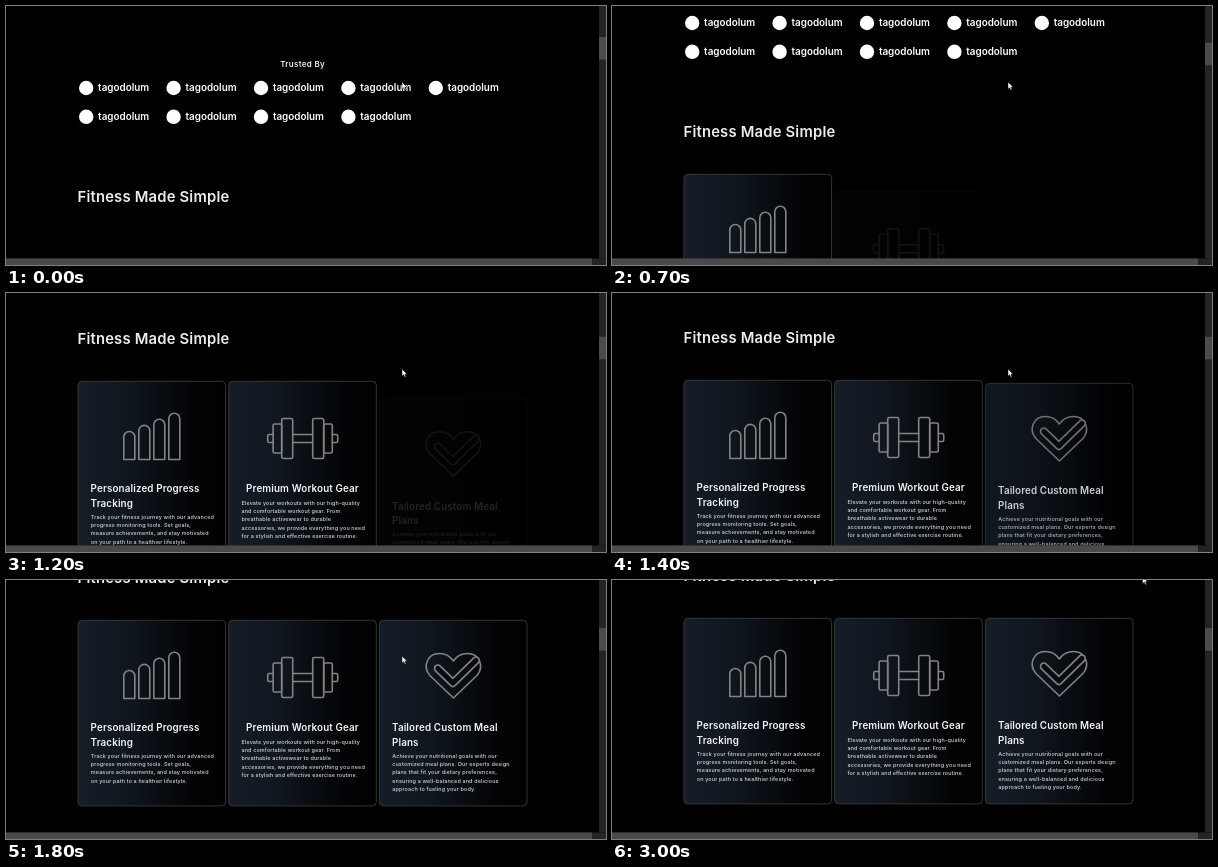
These frames come from a looping animation (600x259 px, 3.2 s). An HTML page:

```html
<!DOCTYPE html>
<html lang="en">
<head>
<meta charset="utf-8">
<title>Scrolling landing page</title>
<style>
  html, body { margin: 0; width: 100%; height: 100%; overflow: hidden; background: #000; }
  svg { display: block; width: 600px; height: 259px; }
  text { font-family: Inter, "Open Sans", sans-serif; fill: #fff; white-space: pre; }
  .heading { font-size: 14.8px; font-weight: 600; letter-spacing: .2px; fill: #ececec; }
  .trusted { font-size: 8px; font-weight: 600; letter-spacing: .3px; fill: #eee; }
  .brand { font-size: 9.9px; font-weight: 600; }
  .title { font-size: 9.8px; font-weight: 600; letter-spacing: .14px; fill: #f4f4f4; }
  .body { font-size: 5.45px; font-weight: 500; letter-spacing: .13px; fill: #d6d6d6; }
  .panel { fill: url(#shade); stroke: #3b3a38; stroke-width: .9; }
  .icon { fill: none; stroke: #838383; stroke-width: 1.6; stroke-linejoin: round; stroke-linecap: round; }
</style>
</head>
<body>
<svg viewBox="0 0 600 259">
  <defs>
    <linearGradient id="shade">
      <stop offset="0" stop-color="#151d27"/>
      <stop offset=".35" stop-color="#10161e"/>
      <stop offset=".8" stop-color="#020305"/>
      <stop offset="1" stop-color="#010102"/>
    </linearGradient>
  </defs>
  <rect width="600" height="259"/>
  <g id="page"></g>
  <g id="bars">
    <rect x="593" width="7" height="252.5" fill="#252424"/>
    <rect id="thumb" x="593" width="7" height="22.5" fill="#4c4b4c"/>
    <rect y="252.5" width="600" height="6.5" fill="#252424"/>
    <rect y="252.5" width="586" height="6.5" fill="#4a494b"/>
  </g>
  <path id="cursor" d="M0 0V7.2L1.7 5.7L2.8 8.2L4 7.7L2.9 5.2H5.1Z" fill="#fff" stroke="#000" stroke-width=".5"/>
</svg>
<script>
const LOOP = 3200, STEP = 100;

// Page offset for every step until the scroll comes to rest.
const SCROLL = [0, 0, 14, 39, 47, 48.5, 49, 65, 88, 96, 109, 133, 145, 146, 146, 146, 156, 181, 193, 195];
// Share of a card's entrance done, step by step.
const REVEAL = [.14, .65, .85, .95, 1];
const RISE = 20;
// [start ms, x, y]
const POINTER = [[0, 396, 76], [2300, 396.5, 76], [2400, 397, 76], [2900, 455, 42], [3000, 530.5, -3.5]];

const byId = id => document.getElementById(id);
const page = byId('page');

function add(parent, tag, attrs, content) {
  const node = document.createElementNS('http://www.w3.org/2000/svg', tag);
  for (const key in attrs) node.setAttribute(key, attrs[key]);
  if (content) node.textContent = content;
  parent.append(node);
  return node;
}
const label = (parent, kind, x, y, words, anchor = 'start') =>
  add(parent, 'text', { class: kind, x, y, 'text-anchor': anchor }, words);
const icon = (parent, d, extra = {}) => add(parent, 'path', { class: 'icon', d, ...extra });

label(page, 'trusted', 296.6, 60.8, 'Trusted By', 'middle');
for (let i = 0; i < 9; i++) {
  const x = 72.5 + (i % 5) * 87.4, y = i < 5 ? 82 : 110.8;
  add(page, 'circle', { cx: x + 7.7, cy: y, r: 7.2, fill: '#fff' });
  label(page, 'brand', x + 19.6, y + 3, 'tagodolum');
}
label(page, 'heading', 71.5, 196.4, 'Fitness Made Simple');

function drawChart(g) {
  for (let i = 0; i < 4; i++) {
    const x = 45.8 + i * 15, top = 289 - i * 6.1;
    icon(g, `M${x} 311.5V${top}a5.5 5.5 0 0 1 11 0V311.5Z`);
  }
}

function drawDumbbell(g) {
  for (const side of [-1, 1]) {
    const half = add(g, 'g', { transform: `translate(74 290.5) scale(${side} 1)` });
    icon(half, 'M10 -4H0M10 4H0');
    for (const [x, w, h] of [[10, 11, 40], [21, 8.6, 29]])
      add(half, 'rect', { class: 'icon', x, y: -h / 2, width: w, height: h, rx: 1.6 });
    icon(half, 'M29.6 -4H33.6Q35 -4 35 -2.6V2.6Q35 4 33.6 4H29.6');
  }
}

function drawHeart(g) {
  icon(g, 'M74 311L50.5 288.5C43 280 47.500 266.500 60 266.500C66 266.500 71 269.500 74 274' +
          'C77 269.500 82 266.500 88 266.500C100.500 266.500 105 280 97.500 288.500Z');
  const tick = 'M58.500 281.500L73.500 296L96.500 273.500';
  icon(g, tick, { style: 'stroke-width:8.4' });
  icon(g, tick, { style: 'stroke-width:5.2;stroke:#080b10' });
}

const CARDS = [
  { x: 72, draw: drawChart, title: ['Personalized Progress', 'Tracking'], lines: [
    'Track your fitness journey with our advanced', 'progress monitoring tools. Set goals,',
    'measure achievements, and stay motivated', 'on your path to a healthier lifestyle.'] },
  { x: 222.7, draw: drawDumbbell, title: ['Premium Workout Gear'], lines: [
    'Elevate your workouts with our high-quality', 'and comfortable workout gear. From',
    'breathable activewear to durable', 'accessories, we provide everything you need',
    'for a stylish and effective exercise routine.'] },
  { x: 373.4, draw: drawHeart, title: ['Tailored Custom Meal', 'Plans'], lines: [
    'Achieve your nutritional goals with our', 'customized meal plans. Our experts design',
    'plans that fit your dietary preferences,', 'ensuring a well-balanced and delicious',
    'approach to fueling your body.'] },
];

const cards = CARDS.map(({ x, draw, title, lines }) => {
  const mover = add(page, 'g', {});
  const g = add(mover, 'g', { transform: `translate(${x} 0)` });
  add(g, 'rect', { class: 'panel', x: 0, y: 233.3, width: 147.6, height: 185.6, rx: 4 });
  draw(g);
  const single = title.length === 1;
  title.forEach((words, i) =>
    label(g, 'title', single ? 73.8 : 12.6, 344.4 + i * 14.1, words, single ? 'middle' : 'start'));
  const top = 356.8 + (title.length - 1) * 14.1;
  lines.forEach((words, i) => label(g, 'body', 12.800, top + i * 8.25, words));
  return mover;
});

function render(time) {
  const step = Math.floor(time / STEP);
  const offset = SCROLL[Math.min(step, SCROLL.length - 1)];
  page.setAttribute('transform', `translate(0 ${-offset})`);
  byId('thumb').setAttribute('y', 31 + offset * .088);

  cards.forEach((card, i) => {
    const age = step - 2 - i * 5;
    const shown = age < 0 ? 0 : REVEAL[Math.min(age, REVEAL.length - 1)];
    card.setAttribute('opacity', shown);
    card.setAttribute('transform', `translate(0 ${RISE * (1 - shown)})`);
  });

  const [, x, y] = POINTER.filter(([start]) => start <= time).pop();
  byId('cursor').setAttribute('transform', `translate(${x} ${y})`);
}

const started = performance.now();
function tick() {
  render((performance.now() - started) % LOOP);
  requestAnimationFrame(tick);
}
tick();
</script>
</body>
</html>
```
